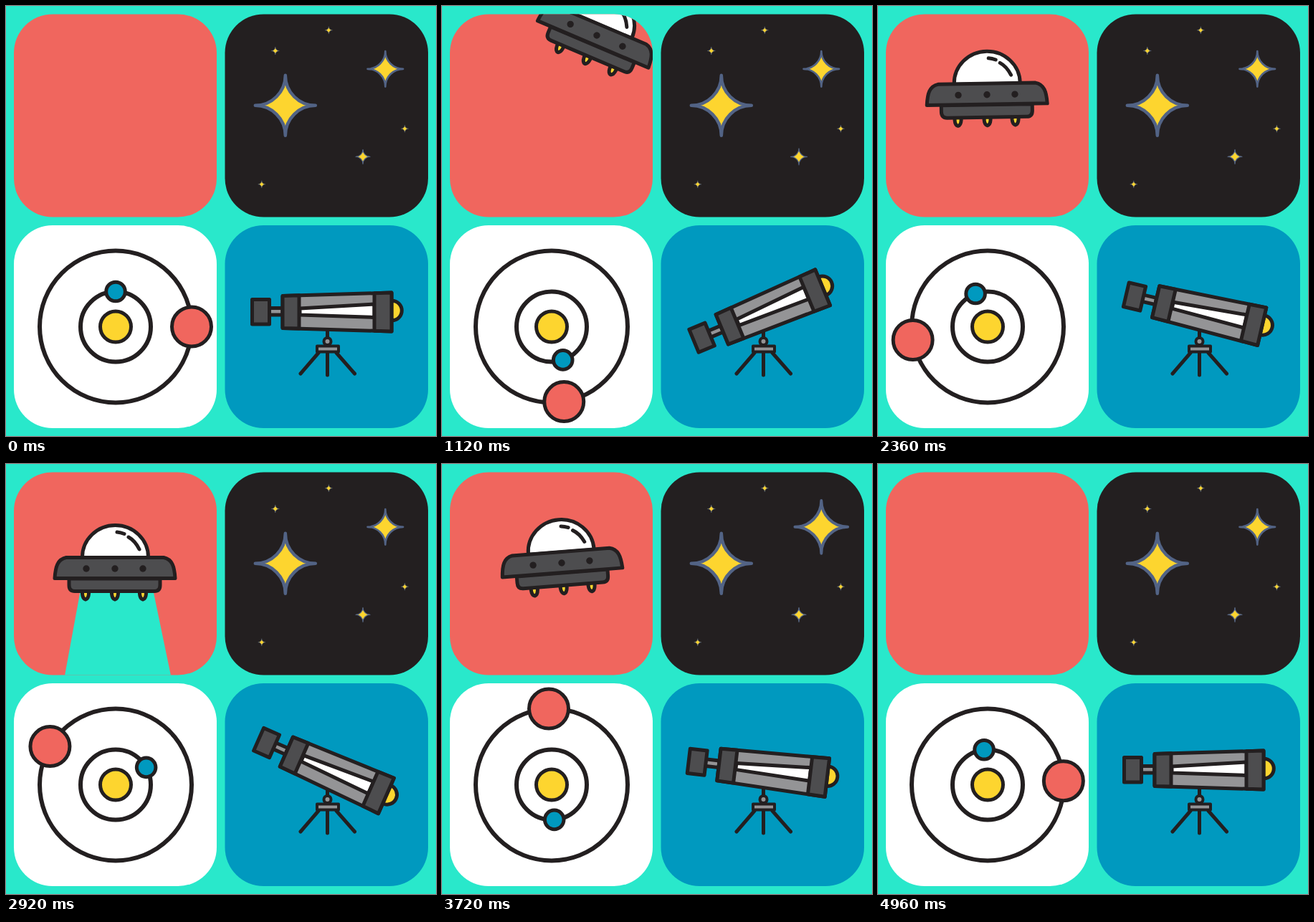
An HTML page that plays this animation: 600 px wide and 600 px high, repeating every 5 s.

```html
<!DOCTYPE html>
<html lang="en">
<head>
<meta charset="utf-8">
<title>Space tiles</title>
<style>
  html, body { margin: 0; width: 100%; height: 100%; overflow: hidden; background: #29e8cb; }
  svg { display: block; width: 100%; height: 100%; }
  .ink { stroke: #231f20; stroke-width: 5; stroke-linejoin: round; stroke-linecap: round; }
  .line { fill: none; }
  .dark { fill: #4d4d4f; }
  .grey { fill: #949496; }
  .white { fill: #fff; }
  .sun { fill: #fdd52f; }
  .red { fill: #f0665e; }
  .blue { fill: #0099bf; }
</style>
</head>
<body>
<svg viewBox="0 0 600 600">
  <defs>
    <clipPath id="tile"><rect x="11" y="11.5" width="283" height="283" rx="54"/></clipPath>
    <path id="star" d="M0-42A42 42 0 0 0 42 0A42 42 0 0 0 0 42A42 42 0 0 0-42 0A42 42 0 0 0 0-42Z"
      fill="#fdd52f" stroke="#526385" stroke-width="4.5" stroke-linejoin="round"/>
    <path id="jet" class="ink sun" d="M-4.5 31V35Q-4 42 0 43Q4 42 4.5 35V31Z" stroke-width="4.5"/>
  </defs>
  <rect width="600" height="600" fill="#29e8cb"/>
  <rect class="red" x="11" y="11.5" width="283" height="283" rx="54"/>
  <rect x="305.5" y="11.5" width="283.5" height="283" rx="54" fill="#231f20"/>
  <rect class="white" x="11" y="306" width="283" height="283" rx="54"/>
  <rect class="blue" x="305.5" y="306" width="283.5" height="283" rx="54"/>

  <g clip-path="url(#tile)">
    <path id="beam" fill="#29e8cb"/>
    <g id="ufo">
      <use href="#jet" x="-41"/>
      <use href="#jet"/>
      <use href="#jet" x="39"/>
      <path class="ink dark" d="M-64 14H63V23Q63 31.5 55 31.5H-56Q-64 31.5-64 23Z"/>
      <path class="ink white" d="M-45.5-15V-16A46 44.5 0 0 1 46.5-16V-15Z"/>
      <path class="ink line" d="M3-51Q8-50.500 13-48.500M19-44Q28-39 34-27"/>
      <path class="ink dark" d="M-68-15.500H68C80-13 83-3 84 13.500H-84C-83-3-80-13-68-15.500Z"/>
      <g fill="#231f20">
        <circle cx="-40" r="4.700"/><circle r="4.700"/><circle cx="39" r="4.700"/>
      </g>
    </g>
  </g>

  <g id="sky"></g>

  <g class="ink" transform="translate(153 447.500)">
    <circle class="line" r="106" stroke-width="6"/>
    <circle class="line" r="49" stroke-width="6"/>
    <circle class="sun" r="21.500"/>
    <circle id="near" class="blue" r="13.300"/>
    <circle id="far" class="red" r="27.500"/>
  </g>

  <g class="ink">
    <path class="line" d="M448.500 450V474M448.500 484V515M436 484L411 513M461 484L486.500 513"/>
    <circle class="grey" cx="448.500" cy="468" r="5" stroke-width="4"/>
    <rect class="grey" x="434" y="474.500" width="30" height="8" stroke-width="4"/>
    <g id="scope">
      <circle class="sun" cx="538.500" cy="425" r="13.800"/>
      <rect class="grey" x="366" y="421.500" width="20" height="9.500"/>
      <rect class="dark" x="343.500" y="409.500" width="24" height="34.500"/>
      <path class="grey" d="M386 404.500L538 400V454L386 449.500Z"/>
      <path class="white" d="M410 422L514 416V434.500L410 431Z"/>
      <path class="dark" d="M386 404.500L409 403.800V450L386 449.500Z"/>
      <path class="dark" d="M514 400.800L538 400V454L514 453.200Z"/>
    </g>
  </g>
</svg>
<script>
const LOOP = 5000, STEP = 40;
const el = id => document.getElementById(id);
const clamp = v => Math.max(0, Math.min(1, v));
const mix = (a, b, p) => a + (b - a) * p;
const smooth = p => (1 - Math.cos(Math.PI * clamp(p))) / 2;
const ramp = (t, a, b) => smooth((t - a) / (b - a));

// x, y, scale, pulse start times
const stars = [
  [389.8, 138.8, 1],
  [529.3, 87.8, .59, 1680, 3520],
  [498, 210.3, .24, 1030, 4150],
  [375.8, 62.5, .13],
  [450.3, 33.8, .12],
  [556.4, 171.2, .12],
  [356.8, 248.8, .12]
].map(([x, y, size, ...starts]) => {
  const node = document.createElementNS('http://www.w3.org/2000/svg', 'use');
  node.setAttribute('href', '#star');
  el('sky').append(node);
  return { node, x, y, size, starts };
});

// time, x, y, tilt
const flight = [
  [840, 345, -90, 30],
  [1120, 216, 41, 23],
  [1480, 142, 97, 5],
  [1800, 151, 113.5, -5],
  [2200, 152, 108, -2],
  [2600, 152, 146, 0],
  [3360, 152, 146, 0],
  [3720, 167, 138, -4.500],
  [4240, 330, 207, -15],
  [4480, 440, 262, -19]
];

function slope(i, k) {
  const a = flight[i - 1], b = flight[i], c = flight[i + 1];
  if (!a || !c) {
    const [p, q] = a ? [a, b] : [b, c];
    return (q[k] - p[k]) / (q[0] - p[0]);
  }
  if (a[k] === b[k] || b[k] === c[k]) return 0;
  return (c[k] - a[k]) / (c[0] - a[0]);
}

function flightAt(t) {
  const last = flight.length - 1;
  if (t <= flight[0][0]) return flight[0].slice(1);
  if (t >= flight[last][0]) return flight[last].slice(1);
  const i = flight.findIndex(key => key[0] > t) - 1;
  const a = flight[i], b = flight[i + 1], d = b[0] - a[0], p = (t - a[0]) / d;
  const q = 1 - p;
  return [1, 2, 3].map(k =>
    a[k] * (1 + 2 * p) * q * q + b[k] * (3 - 2 * p) * p * p +
    d * p * q * (slope(i, k) * q - slope(i + 1, k) * p));
}

function place(id, x, y, tilt) {
  el(id).setAttribute('transform', `translate(${x} ${y}) rotate(${tilt})`);
}

function orbit(id, radius, turns) {
  const a = turns * 2 * Math.PI;
  place(id, radius * Math.cos(a), radius * Math.sin(a), 0);
}

function draw(t) {
  const p = t / LOOP;
  orbit('far', 106, p);
  orbit('near', 49, 2 * p - .25);

  const tilt = -23 * ramp(t, 0, 1000) + 47 * ramp(t, 1000, 3000) - 24 * ramp(t, 3000, 4120);
  el('scope').setAttribute('transform', `rotate(${tilt} 449 427)`);

  place('ufo', ...flightAt(t));

  const open = ramp(t, 2580, 2840) - ramp(t, 3120, 3360);
  const y = mix(170, 295, open);
  el('beam').setAttribute('d', open > 0
    ? `M105 170H204L${mix(204, 230, open)} ${y}H${mix(105, 82, open)}Z` : '');

  for (const s of stars) {
    let grow = 0;
    for (const start of s.starts) {
      grow += Math.sin(Math.PI * clamp((t - start) / 600)) ** 2;
    }
    s.node.setAttribute('transform',
      `translate(${s.x} ${s.y}) scale(${s.size * (1 + .65 * grow)})`);
  }
}

function tick() {
  draw(Math.floor(performance.now() % LOOP / STEP) * STEP);
  requestAnimationFrame(tick);
}
tick();
</script>
</body>
</html>
```
